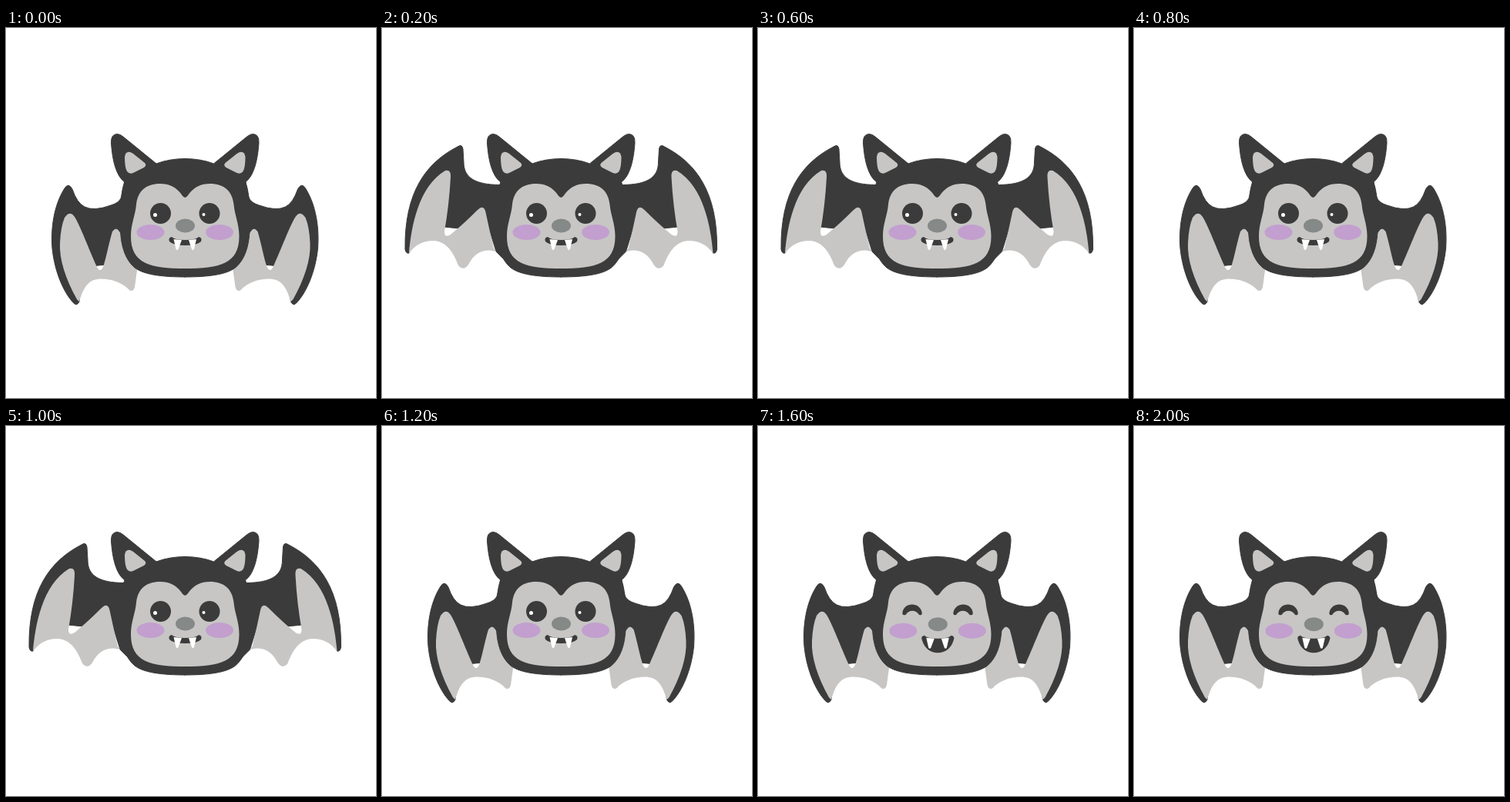
An HTML page that plays this animation: 480x480 px, repeating every 2200 ms.

```html
<!DOCTYPE html>
<html lang="en">
<head>
<meta charset="utf-8">
<title>Flapping bat</title>
<style>
  html, body { margin: 0; width: 100%; height: 100%; overflow: hidden; background: #fff; }
  svg { display: block; width: 100vw; height: 100vh; }
  .dark { fill: #3b3b3b; }
  .outlined { stroke: #3b3b3b; stroke-width: 1; }
  .grey { fill: #c7c6c5; }
  .blush { fill: #c29fce; }
  .nose { fill: #858988; }
  .white { fill: #fff; }
</style>
</head>
<body>
<svg viewBox="0 0 480 480">
  <defs>
    <g id="wingDown">
      <path class="dark outlined" d="M154 196 Q152 212 149 221 Q146 227 136 230 Q114 238 102 232 Q92 227 86 209 Q81 200 76 208
        C62 230 58 260 60 286 C63 316 75 344 88 357 Q92 361 95 355 L100 310 L150 305 L175 290 L175 196Z"/>
      <path class="grey" d="M92 352 C77 325 69 300 70 279 Q71 258 76 246 Q83 236 89 245 C97 258 107 286 118 310
        Q122 318 126 310 C130 298 133 281 138 264 Q143 257 147 264 L172 300 L167 336 Q165 343 160 340
        C150 329 132 324 118 326 C104 328 99 342 95 355Z"/>
    </g>
    <g id="wingUp">
      <path class="dark outlined" d="M152 203.500 C122 203 106 195 106 174 L105 157 Q104 150 98 154
        C57 175 29 213 30 287 Q31 293 35 292 L50 255 L140 264 L148 290 L170 312 L185 310 L185 199Z"/>
      <path class="grey" d="M35 292 C38 258 47 206 82 185 Q90 183 89 194 Q87 230 81 264 Q81 273 89 268
        Q106 254 124 236 Q132 228 134.500 239 Q140 265 145 286 L148 290 C135 286 121 289 112 307
        Q106 316 99 308 C91 286 80 276 66 276 C53 276 44 281 35 292Z"/>
    </g>
    <path id="fur" class="dark outlined" d="M136.500 149 Q136 138 144 137.500 Q148 137.500 152 141 L195 176 Q212 169.500 233 169.500 L233 323
      C202 323 179 320 167 311 C155 301 149 283 148.500 262 C148 235 149 211 154 200 C143 192 138 172 136.500 149Z"/>
    <g id="face">
      <path class="grey" d="M154 167 Q156 157 165 163 L180 175 Q183 178 179 181 L165 188 Q160 190 157 186 Q154 181 154 167Z"/>
      <path class="grey" d="M233 220 Q230 220 227 215 Q217 202 200 202 C182 202 171 211 169 229
        C168 242 162 254 162 270 C162 306 187 312 233 312Z"/>
    </g>
    <ellipse id="cheek" class="blush" cx="187.5" cy="265" rx="18" ry="10"/>
    <circle id="openEye" class="dark" cx="200.5" cy="240.5" r="13.5"/>
    <path id="smilingEye" class="dark" d="M186.500 242 C188 227 210 227 212 242 Q212 246 208 244 C204 237.500 195 237.500 191 244 Q186.500 246 186.500 242Z"/>
  </defs>

  <g class="pair" data-part="wingDown"></g>
  <g class="pair" data-part="wingUp"></g>
  <g class="pair" data-part="fur"></g>
  <g class="pair" data-part="face"></g>

  <g id="features">
    <g class="pair" data-part="cheek"></g>
    <g id="calm">
      <g class="pair" data-part="openEye"></g>
      <circle class="white" cx="193.5" cy="242.5" r="2.5"/>
      <circle class="white" cx="256.5" cy="242" r="2"/>
      <path class="dark" d="M215 271 Q219 275 232.500 275 Q246 275 250 271 Q255 272 253 277 Q248 282 232.500 282 Q217 282 212 277 Q210 272 215 271Z"/>
    </g>
    <g id="happy">
      <g class="pair" data-part="smilingEye"></g>
      <path class="dark" d="M215 271 Q219 275 232.500 275 Q246 275 250 271 Q255 272 253 277 C247 299 218 299 212 277 Q210 272 215 271Z"/>
    </g>
    <ellipse class="nose" cx="232.500" cy="256.500" rx="12.500" ry="9"/>
    <path class="white" d="M217.500 274 L228 275 L223.500 287 Q222 289 220.500 287Z M247 274 L237 275 L241 287 Q242.500 289 244 287Z"/>
  </g>
</svg>
<script>
  const STEP = 200, LOOP = 2200, SMILE_AT = 1400;
  const byId = id => document.getElementById(id);

  // Each paired part is its left half plus a mirror image.
  for (const group of document.querySelectorAll('.pair')) {
    const href = '#' + group.dataset.part;
    group.innerHTML = `<use href="${href}"/><use href="${href}" transform="translate(464.5) scale(-1 1)"/>`;
  }
  const wingsDown = document.querySelector('[data-part=wingDown]');
  const wingsUp = document.querySelector('[data-part=wingUp]');
  const show = (node, on) => node.setAttribute('display', on ? 'inline' : 'none');

  function draw() {
    const time = performance.now() % LOOP;
    const raised = Math.floor(time / STEP) % 2 === 1;
    const smiling = time >= SMILE_AT;
    show(wingsUp, raised);
    show(wingsDown, !raised);
    show(byId('happy'), smiling);
    show(byId('calm'), !smiling);
    byId('features').setAttribute('transform', smiling ? 'translate(0.8 0.7)' : '');
    requestAnimationFrame(draw);
  }
  draw();
</script>
</body>
</html>
```
